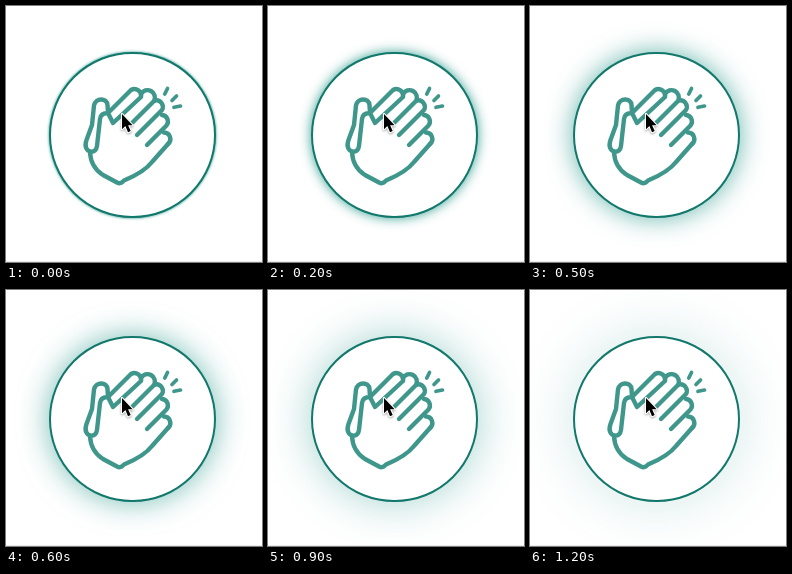
Animation of 256x256 px, one loop 1300 ms. Source, as an HTML page:

```html
<!DOCTYPE html>
<html lang="en">
<head>
<meta charset="utf-8">
<title>Clap button</title>
<style>
  html, body {
    margin: 0;
    width: 100%;
    height: 100%;
    overflow: hidden;
    background: #fff;
  }
  .stage {
    position: relative;
    width: 256px;
    height: 256px;
    overflow: hidden;
  }
  .stage::after {
    content: "";
    position: absolute;
    inset: 255px 0 0;
    background: #e9ebeb;
  }
  .clap {
    position: absolute;
    left: 43.2px;
    top: 45.7px;
    width: 166.6px;
    height: 166.6px;
    box-sizing: border-box;
    border: 2.3px solid #12786b;
    border-radius: 50%;
    background: #fff;
    animation: shockwave 1300ms steps(13) infinite;
  }
  /* The glow widens and fades, then snaps back. */
  @keyframes shockwave {
    from { box-shadow: 0 0 3px rgba(27, 146, 132, 1); }
    to { box-shadow: 0 0 62px rgba(27, 146, 132, .14); }
  }
  svg {
    position: absolute;
    inset: 0;
  }
  .hands {
    fill: none;
    stroke: #3f978c;
    stroke-width: 4.4;
    stroke-linecap: round;
    stroke-linejoin: round;
  }
  .sparks { stroke-width: 3.7; }
  .cursor {
    fill: #000;
    stroke: #fff;
    stroke-width: 2.2;
    stroke-linejoin: round;
    paint-order: stroke;
    filter: drop-shadow(0 1px 1px rgba(0, 0, 0, .35));
  }
</style>
</head>
<body>
<div class="stage">
  <div class="clap"></div>
  <svg width="256" height="256" viewBox="0 0 256 256">
    <g class="hands">
      <!-- thumb -->
      <path d="M102 107 L101.500 99 C101 91.500 89.500 91.500 88 99.500 L86 119 L80.500 134 C78 141 81 145 84.500 145.500 C88 146 90.500 144 91 140 L94 113 C94.500 108.500 98 107 102 107"/>
      <!-- palm and wrist -->
      <path d="M84 146 C84.500 157 89 164 97 169 L111 176.500 C114 178 116 177 118 174.500 C129 170 139 165 146 156 L162 138"/>
      <!-- fingers -->
      <path d="M102 107 L125 84 A6.700 6.700 0 0 1 135 91 L107 117 Z"/>
      <path d="M135 88 A7.200 7.200 0 0 1 148 95 L126 117"/>
      <path d="M149 94.500 A6.500 6.500 0 0 1 156 104 L131 129"/>
      <path d="M156 109 A6.500 6.500 0 0 1 160.500 119.500 L141 139"/>
      <path d="M158 126.500 A6.500 6.500 0 0 1 162 138"/>
      <path class="sparks" d="M158.800 88 L161.500 82.500 M166 94.500 L170.500 90 M168 101.300 L174.500 100"/>
    </g>
    <path class="cursor" d="M116 108 V123.200 L119.400 120 L122 126.200 L124.700 125 L122.100 119.200 H126.600 Z"/>
  </svg>
</div>
</body>
</html>
```
